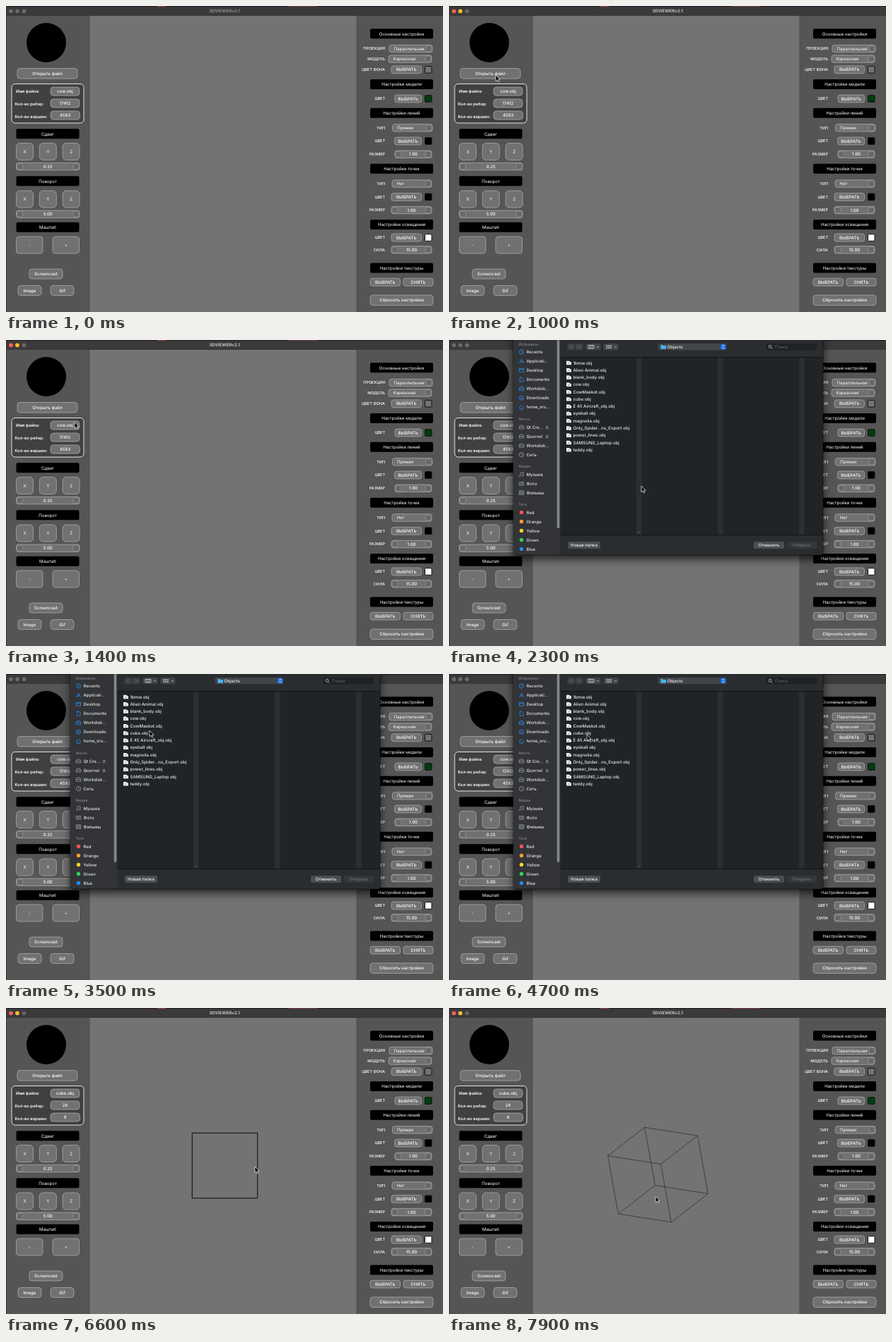
These frames come from a looping animation (618 px wide and 434 px high, 8 s). An HTML page:

```html
<!DOCTYPE html>
<html lang="ru">
<head>
<meta charset="utf-8">
<style>
  html, body { margin: 0; width: 100%; height: 100%; overflow: hidden; background: #555; }
  svg { display: block; font-family: Inter, "Noto Sans", sans-serif; }
  text { white-space: pre; text-rendering: geometricPrecision; }
  .sheet { filter: drop-shadow(0 6px 6px rgba(0, 0, 0, .65)); }
</style>
</head>
<body>
<svg id="stage" width="618" height="434" viewBox="0 0 618 434"></svg>
<script>
const LOOP = 8000, STEP = 100;
const stage = document.getElementById('stage');

// Markup helpers
const rect = (x, y, x2, y2, fill, extra = '') =>
  `<rect x="${x}" y="${y}" width="${x2 - x}" height="${y2 - y}" fill="${fill}" ${extra}/>`;
const text = (x, y, s, { size = 6.1, fill = '#fff', anchor = 'start', weight = 400, id = '' } = {}) =>
  `<text ${id && `id="${id}"`} x="${x}" y="${y + size * 0.36}" font-size="${size}" fill="${fill}" text-anchor="${anchor}" font-weight="${weight}">${s}</text>`;
const middle = (x, y, s, o) => text(x, y, s, { anchor: 'middle', ...o });
const path = (d, stroke, extra = '') => `<path d="${d}" fill="none" stroke="${stroke}" ${extra}/>`;

// Main window widgets
const box = (x, y, x2, y2, r = 3) => rect(x, y, x2, y2, '#717171', `rx="${r}" stroke="#a9a9a9" stroke-width=".8"`);
const button = (x, y, x2, y2, s, o = {}) => box(x, y, x2, y2, o.r) + middle((x + x2) / 2, (y + y2) / 2, s, o);
const header = (x, y, s) => rect(x, y, x + 89, y + 14, '#000', 'rx="2"') + middle(x + 44.5, y + 7.2, s);
const knob = (x, y) => rect(x, y, x + 8, y + 8, '#686868', 'rx="1.5" stroke="#999" stroke-width=".7"');
const spin = (x, x2, y, s) => button(x, y - 5.2, x2, y + 5.2, s, { weight: 500 }) + knob(x + 1, y - 4) + knob(x2 - 9, y - 4);
const combo = (x, x2, y, s) => box(x, y - 5.2, x2, y + 5.2) + text(x + 6.5, y, s) + knob(x2 - 9, y - 4);
const label = (y, s) => text(536, y, s, { size: 5.5, anchor: 'end', weight: 500 });
const choose = (x, y, color) => button(x, y - 5.4, 587.5, y + 5.4, 'ВЫБРАТЬ', { weight: 500 }) +
  rect(592.5, y - 4.8, 602, y + 4.8, color, 'rx="1" stroke="#111" stroke-width="1"');
const axes = y => ['X', 'Y', 'Z'].map((s, i) => button(14.5 + i * 32.8, y, 38.5 + i * 32.8, y + 24, s, { r: 5 })).join('');

const titleBar = `
  ${rect(0, 0, 618, 14, '#3b3a3a')}${rect(0, 0, 618, 1, '#201a2b')}
  ${rect(214, 0, 226, 1, '#a33b45')}${rect(400, 0, 440, 1, '#7a3550')}
  ${[7, 16, 25.5].map(x => `<circle class="light" cx="${x}" cy="7.3" r="2.9"/>`).join('')}
  ${middle(309, 7.3, '3DVIEWERv2.1', { weight: 700, id: 'title' })}`;

const leftPanel = `
  ${rect(0, 14, 118, 434, '#555')}${rect(0, 14, 1, 434, '#3a2b38')}
  <circle cx="57" cy="52" r="28"/>
  ${button(16, 88.5, 101, 103, 'Открыть файл', { r: 4, weight: 500 })}
  ${rect(8, 110.5, 110, 166, '#404040', 'rx="5" stroke="#e4e4e4"')}
  ${text(14, 121, 'Имя файла:', { size: 5.8, weight: 600 })}
  ${text(12.5, 138.5, 'Кол-во ребер:', { size: 5.8, weight: 600 })}
  ${text(12.5, 156.5, 'Кол-во вершин:', { size: 5.8, weight: 600 })}
  ${button(63, 115, 104, 127, 'cow.obj', { id: 'file', weight: 500, r: 4 })}
  ${button(63, 132, 104, 144, '17412', { id: 'edges', weight: 500, r: 4 })}
  ${button(63, 149, 104.5, 161, '4583', { id: 'points', weight: 500, r: 4 })}
  ${header(14.5, 174.3, 'Сдвиг')}${axes(194.5)}${spin(14.5, 104, 227.6, '0.25')}
  ${header(14.5, 241.3, 'Поворот')}${axes(262)}${spin(14.5, 104, 295.2, '5.00')}
  ${header(14.5, 306.8, 'Маштаб')}
  ${button(14.5, 327, 52, 351, '-', { r: 4 })}${button(66, 327, 103.5, 351, '+', { r: 4 })}
  ${button(33, 373, 80, 387, 'Screencast', { r: 4, weight: 500 })}
  ${button(17, 396.5, 50, 410.5, 'Image', { r: 4, weight: 500 })}
  ${button(63, 396.5, 96, 410.5, 'Gif', { r: 4, weight: 500 })}`;

const rightPanel = `
  ${rect(496, 14, 618, 434, '#555')}
  ${header(515, 32.3, 'Основные настройки')}
  ${label(60.5, 'ПРОЕКЦИЯ')}${combo(542, 603, 60.5, 'Параллельная')}
  ${label(75, 'МОДЕЛЬ')}${combo(541, 602, 75, 'Каркасная')}
  ${label(90.3, 'ЦВЕТ ФОНА')}${choose(545, 90.3, '#737373')}
  ${header(515, 104, 'Настройки модели')}
  ${label(131.5, 'ЦВЕТ')}${choose(550, 131.5, '#003d10')}
  ${header(515, 144.7, 'Настройки линий')}
  ${label(172.8, 'ТИП')}${combo(546.5, 603, 172.8, 'Прямая')}
  ${label(191.5, 'ЦВЕТ')}${choose(549.5, 191.5, '#000')}
  ${label(210.3, 'РАЗМЕР')}${spin(550, 602, 210.3, '1.00')}
  ${header(515, 223.7, 'Настройки точек')}
  ${label(252, 'ТИП')}${combo(546, 602, 252, 'Нет')}
  ${label(270.8, 'ЦВЕТ')}${choose(545, 270.8, '#000')}
  ${label(289.5, 'РАЗМЕР')}${spin(545, 602, 289.5, '1.00')}
  ${header(515, 303, 'Настройки освещения')}
  ${label(328.5, 'ЦВЕТ')}${choose(545, 328.5, '#fff')}
  ${label(345.8, 'СИЛА')}${spin(545, 602, 345.8, '15.00')}
  ${header(515, 364.5, 'Настройки текстуры')}
  ${button(515, 386.3, 557.5, 397, 'ВЫБРАТЬ', { weight: 500 })}
  ${button(562, 386.3, 604, 397, 'СНЯТЬ', { weight: 500 })}
  ${button(515, 410, 604, 424.5, 'Сбросить настройки', { r: 4, weight: 500 })}`;

// File dialog
const BLUE = '#2b8df0', GREY = '#9a9c9e';
const icons = {
  clock: 'M99.3 0a3.2 3.2 0 1 0 6.4 0a3.2 3.2 0 1 0-6.4 0M102.5-2V0L104 1',
  apps: 'M99.5 3L102.5-3L105.5 3M100 1H105',
  desk: 'M99.3-2.7H105.7V2.3H99.3ZM99.3-1H105.7',
  doc: 'M100.3-3.2H103L105-1V3.2H100.3Z',
  disk: 'M99.2 0L100.5-2.5H104.5L105.8 0V2.5H99.2ZM99.2 0H105.8',
  down: 'M99.3 0a3.2 3.2 0 1 0 6.4 0a3.2 3.2 0 1 0-6.4 0M102.5-2V1.8L101 .3M102.5 1.8L104 .3',
  home: 'M99.2 0L102.5-3L105.8 0M100.2-.5V2.8H104.8V-.5',
  note: 'M101 2.3V-2.3L105-3V1.5M101 2.3a.8.8 0 1 1-.8-.8M105 1.5a.8.8 0 1 1-.8-.8',
  photo: 'M99.3-2H105.7V2.5H99.3ZM101.2 .2a1.3 1.3 0 1 0 2.6 0a1.3 1.3 0 1 0-2.6 0',
  film: 'M99.3-2.7H105.7V2.7H99.3ZM101-2.7V2.7M104-2.7V2.7M101 0H104'
};
const place = (y, icon, s, color) =>
  path(icons[icon], color, `stroke-width=".8" transform="translate(0 ${y})"`) + text(109.5, y, s, { size: 6, fill: '#e8e8e8', weight: 500 });
const section = (y0, color, items) => items.map(([icon, s], i) => place(y0 + i * 13.05, icon, s, color)).join('');
const caption = (y, s) => text(98.5, y, s, { size: 5.1, fill: '#7d7f82', weight: 600 });
const eject = y => `<path d="M136.5 ${y + .5}l2.2-2.5l2.2 2.5zm0 1h4.4v.9h-4.4z" fill="#8a8c8e"/>`;
const tags = [['Red', '#ff5257'], ['Orange', '#ff9f2e'], ['Yellow', '#ffd426'], ['Green', '#32d158'], ['Blue', '#1e8cff']];
const files = ['1bmw.obj', 'Alien Animal.obj', 'blank_body.obj', 'cow.obj', 'CowMaskot.obj', 'cube.obj',
  'E 45 Aircraft_obj.obj', 'eyeball.obj', 'magnolia.obj', 'Only_Spider...ns_Export.obj', 'power_lines.obj',
  'SAMSUNG_Laptop.obj', 'teddy.obj'];
const fileRow = (s, i) => {
  const y = 32.4 + i * 10.27;
  return `<path d="M166 ${y - 2.6}h4l3 2v3.4h-7z" fill="#f2f2f2"/>` +
    path(`M168 ${y}l2 1.5m0-2.5v2`, '#777', 'stroke-width=".6"') +
    text(175.5, y, s, { fill: '#ececec', weight: 500 });
};
const pill = (x, x2, s, fill, color) => rect(x, 286, x2, 296, fill, 'rx="2"') + middle((x + x2) / 2, 291, s, { fill: color, weight: 500 });
const dateRow = (y, s) => text(278, y, s, { size: 5.2, fill: '#a0a2a4', weight: 500 }) +
  text(518, y, 'Сегодня, 2:33 AM', { size: 5, anchor: 'end', fill: '#e6e6e6', weight: 600 });

const preview = `
  ${rect(162, 78.6, 261.5, 89.4, '#0a55d2', 'rx="2"')}${fileRow(files[5], 5)}
  ${rect(273, 25, 529, 276.5, '#1f2225')}
  ${rect(524.3, 26, 528, 264, '#77797b', 'rx="1.8"')}
  <path d="M331 62.5L397.5 50L464 62.5L397.5 72Z" fill="#fff"/>
  <path d="M331 62.5L397.5 72V173.5H389L341 147Z" fill="#e9e9e9"/>
  <path d="M464 62.5L397.5 72V173.5H406L454 147Z" fill="url(#shade)"/>
  ${text(277.5, 190, 'cube.obj', { size: 6.7, weight: 600 })}
  ${text(277.5, 200, 'Geometry Definition File Format — 911 Б', { size: 5.9, fill: '#909294' })}
  ${text(277.5, 211, 'Информация', { size: 5.9, weight: 600 })}
  ${dateRow(221.8, 'Создан')}${dateRow(232.5, 'Изменен')}${dateRow(243.2, 'Использован')}
  ${path('M278 227.2H518M278 238H518M278 249H518', '#3a3d40', 'stroke-width=".6"')}
  ${text(277.5, 258, 'Теги', { size: 5.9, weight: 600 })}
  ${text(277.5, 268, 'Теги...', { size: 5.6, fill: '#56585b' })}`;

const dialog = `
  ${rect(91, -12, 529, 305, '#212427', 'class="sheet" rx="5" stroke="#0c0c0c" stroke-opacity=".6"')}
  ${rect(91, -12, 157.5, 304.5, '#323437', 'rx="4"')}
  ${rect(157.5, 0, 528.5, 24, '#2a2d30')}${rect(157.5, 277, 528.5, 304.5, '#2a2d30')}
  ${path('M157.5 24.5H529M157.5 276.5H529', '#111315', 'stroke-width="1"')}
  ${[265, 380, 495].map(x => rect(x, 25, x + 7.5, 276, '#2c2f32')).join('')}
  ${rect(152.7, 0, 156.3, 267, '#85878a', 'rx="1.8"')}
  ${caption(6, 'Избранное')}
  ${section(17, BLUE, [['clock', 'Recents'], ['apps', 'Applicati...'], ['desk', 'Desktop'], ['doc', 'Documents'],
    ['disk', 'Workdisk...'], ['down', 'Downloads'], ['home', 'home_vru...']])}
  ${caption(112.5, 'Места')}
  ${section(123.5, GREY, [['disk', 'Qt Cre...'], ['disk', 'Quorvel'], ['disk', 'Workdisk...'], ['clock', 'Сеть']])}
  ${eject(123.5)}${eject(136.5)}
  ${caption(179.5, 'Медиа')}
  ${section(190.5, GREY, [['note', 'Музыка'], ['photo', 'Фото'], ['film', 'Фильмы']])}
  ${caption(233.5, 'Теги')}
  ${tags.map(([s, c], i) => `<circle cx="102.5" cy="${244.5 + i * 13}" r="2.7" fill="${c}"/>` +
    text(109.5, 244.5 + i * 13, s, { size: 6, fill: '#e8e8e8', weight: 500 })).join('')}
  ${rect(167.5, 5, 178, 14.3, '#3f4245', 'rx="2"')}${rect(179, 5, 189.5, 14.3, '#3f4245', 'rx="2"')}
  ${path('M173.6 7.7L171.6 9.7L173.6 11.7M183.3 7.7L185.3 9.7L183.3 11.7', '#777', 'stroke-width=".8"')}
  ${rect(193.5, 5, 214.5, 14.3, '#424548', 'rx="2"')}${rect(218.5, 5, 239.5, 14.3, '#424548', 'rx="2"')}
  ${path('M197 7.5H205V12H197ZM199.7 7.5V12M202.3 7.5V12M209 9L210.5 10.5L212 9M234 9L235.5 10.5L237 9', '#d5d5d5', 'stroke-width=".8"')}
  ${path('M222.5 8.4H230M222.5 11.2H230', '#d5d5d5', 'stroke-width="1.6" stroke-dasharray="1.8 .9"')}
  ${rect(295.5, 5, 392, 14.3, '#434649', 'rx="2"')}${rect(384.2, 5.8, 391.4, 13.5, '#1a70e8', 'rx="1.8"')}
  ${path('M386.4 8.8L387.8 7.2L389.2 8.8M386.4 10.5L387.8 12.1L389.2 10.5', '#fff', 'stroke-width=".8"')}
  <path d="M299.5 7h2.5l1 1h4v4.7h-7.5z" fill="#45b6f0"/>
  ${text(308.5, 9.8, 'Objects', { fill: '#f0f0f0', weight: 500 })}
  ${rect(448.5, 5, 520, 14.5, '#1f2124', 'rx="2"')}
  ${path('M452 9.2a2 2 0 1 0 4 0a2 2 0 1 0-4 0M455.5 10.8L457.5 12.8', '#c5c5c5', 'stroke-width=".8"')}
  ${text(461, 9.8, 'Поиск', { fill: '#696b6e' })}
  ${files.map(fileRow).join('')}
  ${pill(168, 214, 'Новая папка', '#4b4e51', '#f2f2f2')}
  ${pill(431, 474, 'Отменить', '#4b4e51', '#f2f2f2')}
  ${pill(478, 520, 'Открыть', '#34373a', '#707376')}
  <g id="selected">${pill(478, 520, 'Открыть', '#1583f2', '#fff')}</g>
  <g id="preview">${preview}</g>
  ${path('M267.5 271v3M269.5 271v3', '#56595c', 'stroke-width=".7"')}`;

stage.innerHTML = `
  <defs><linearGradient id="shade"><stop stop-color="#949494"/><stop offset="1" stop-color="#9e9e9e"/></linearGradient></defs>
  ${rect(0, 0, 618, 434, '#737373')}
  ${leftPanel}${rightPanel}${path('M118 14V434M496 14V434', '#494949', 'stroke-width=".8"')}
  ${titleBar}
  ${path('', '#111', 'id="cube" stroke-width=".8"')}
  <g id="dialog">${dialog}</g>
  <path id="cursor" d="M0 0V8.6L2 6.9L3.4 10L4.9 9.3L3.5 6.3H6.2Z" fill="#000" stroke="#e8e8e8" stroke-width=".8"/>`;

const el = Object.fromEntries([...stage.querySelectorAll('[id]')].map(e => [e.id, e]));
const lights = stage.querySelectorAll('.light');

// Keyed motion: [time, x, y]
const cursorKeys = [[100, 426, 226], [800, 63, 97], [1000, 66, 98], [1300, 73, 105], [1900, 396, 261], [2300, 272, 207],
  [2600, 272, 207], [3400, 203, 80], [3900, 202, 80], [4200, 195, 46], [4450, 190, 62], [4700, 195, 86], [5200, 195, 86],
  [5700, 495, 291], [6000, 495, 291], [6600, 352, 225], [6900, 340, 234], [7200, 319, 243], [7400, 326, 247],
  [7500, 326, 247], [7900, 292, 267]];
const dragKeys = [[6900, 0, 0], [7200, -21, 9], [7400, -14, 13]];

const clamp = v => Math.max(0, Math.min(1, v));
const ramp = (t, a, b) => clamp((t - a) / (b - a));
function follow(keys, t) {
  const i = keys.findIndex(k => k[0] > t);
  if (i === 0) return keys[0].slice(1);
  if (i < 0) return keys[keys.length - 1].slice(1);
  const [t0, x0, y0] = keys[i - 1], [t1, x1, y1] = keys[i];
  const k = ramp(t, t0, t1), e = k * k * (3 - 2 * k);
  return [x0 + (x1 - x0) * e, y0 + (y1 - y0) * e];
}

// Orthographic wireframe: twelve edges from three projected axes
function cubePath(cx, cy, turn) {
  const size = 92.4, [yaw, pitch, roll] = [39.2, 25.2, 10.2].map(a => a * turn * Math.PI / 180);
  const { sin, cos } = Math;
  const dirs = [[cos(yaw), sin(yaw) * sin(pitch)], [-sin(yaw), cos(yaw) * sin(pitch)], [0, cos(pitch)]]
    .map(([x, y]) => [size * (x * cos(roll) + y * sin(roll)), size * (y * cos(roll) - x * sin(roll))]);
  let d = '';
  dirs.forEach((a, i) => {
    const b = dirs[(i + 1) % 3], c = dirs[(i + 2) % 3];
    for (const p of [-1, 1]) for (const q of [-1, 1]) {
      const [x, y] = [0, 1].map(n => (p * b[n] + q * c[n] - a[n]) / 2);
      d += `M${cx + x} ${cy + y}l${a[0]} ${a[1]}`;
    }
  });
  return d;
}

const show = (node, on) => node.style.display = on ? '' : 'none';

function render(t) {
  const opened = t < 4000 ? ramp(t, 1400, 1700) : 1 - ramp(t, 5900, 6200);
  const active = t >= 1000 && opened === 0;
  const loaded = t >= 6200;

  lights.forEach((l, i) => l.setAttribute('fill', active ? ['#ff5f57', '#febc2e', '#666'][i] : '#6b6b6b'));
  el.title.setAttribute('fill', active ? '#c4c4c4' : '#8c8c8c');
  el.file.textContent = loaded ? 'cube.obj' : 'cow.obj';
  el.edges.textContent = loaded ? '24' : '17412';
  el.points.textContent = loaded ? '8' : '4583';

  show(el.dialog, opened > 0);
  el.dialog.setAttribute('opacity', opened);
  show(el.selected, t >= 5000);
  show(el.preview, t >= 5000);

  const turn = ramp(t, 7500, 7900), [dx, dy] = follow(dragKeys, t);
  show(el.cube, loaded);
  el.cube.setAttribute('d', cubePath(309.5 + dx, 223.5 + dy, turn));
  el.cube.setAttribute('stroke-opacity', turn ? 0.65 : 0.9);

  show(el.cursor, t >= 100);
  el.cursor.setAttribute('transform', `translate(${follow(cursorKeys, t)})`);
}

const start = performance.now();
function tick() {
  const t = (performance.now() - start) % LOOP;
  render(Math.floor(t / STEP) * STEP);
  requestAnimationFrame(tick);
}
tick();
</script>
</body>
</html>
```
